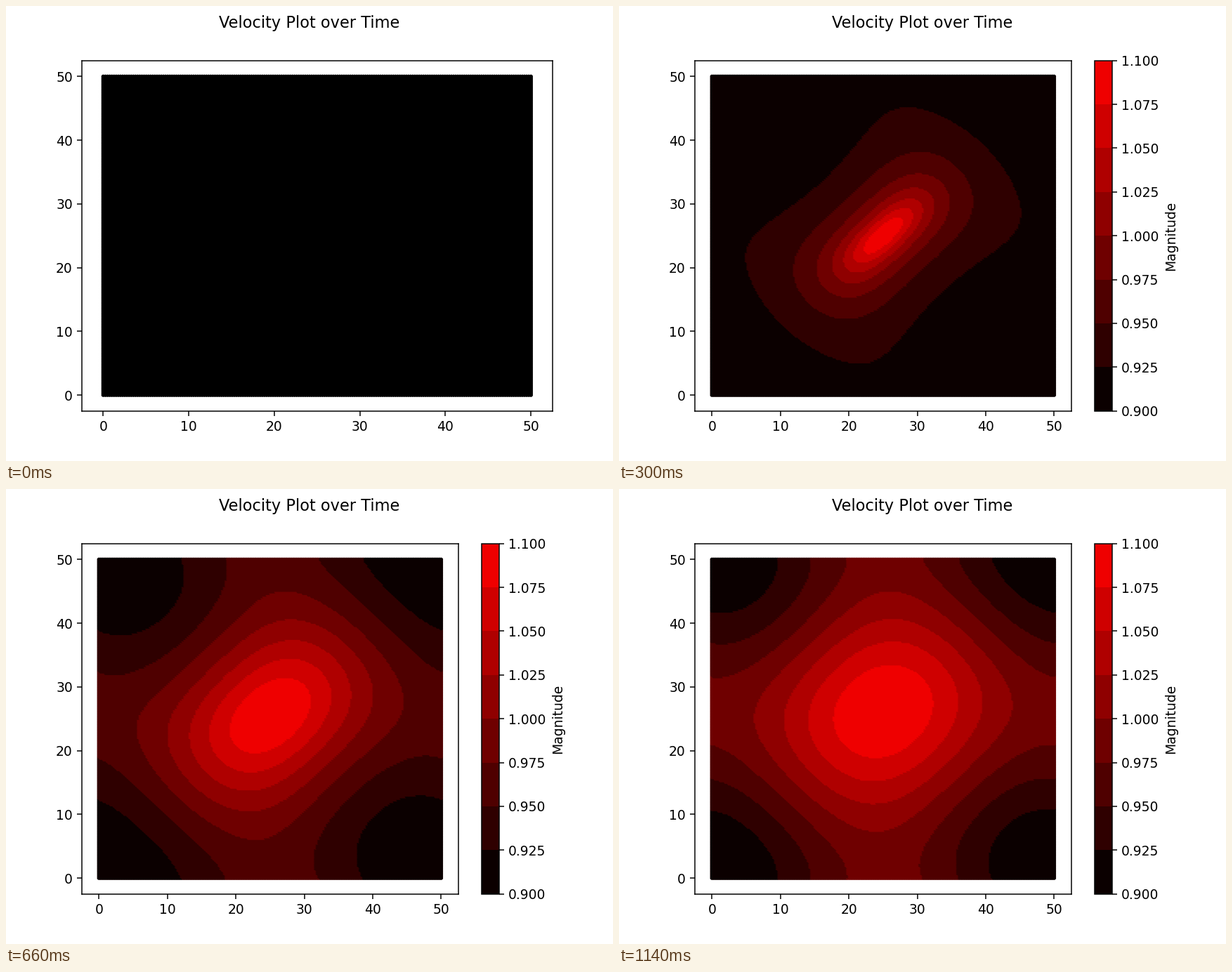
A matplotlib script for the animation above (1200 ms loop, 864x648 px).

```python
import numpy as np
import matplotlib.pyplot as plt
from matplotlib.animation import FuncAnimation
from matplotlib.colors import ListedColormap

FRAMES, INTERVAL = 20, 60
SIZE, POINTS = 50, 200
PERIOD = SIZE * POINTS / (POINTS - 1)
CENTRE = PERIOD / 2

axis = np.linspace(0, SIZE, POINTS)
gx, gy = (g.ravel() for g in np.meshgrid(axis, axis))


def blob(n):
    """Periodic tilted blob: 1 at its centre, 0 at the opposite corner."""
    age = max(n - 3, 0)
    sharpness = 96 / (age ** 2 + 0.1)
    tilt = min(0.8, 0.99 * np.exp(-age / 9.5))
    drift = 0.08 * max(n - 4, 0)
    x = 2 * np.pi * (gx - CENTRE) / PERIOD
    y = 2 * np.pi * (gy - CENTRE - drift) / PERIOD
    q = np.sin(x / 2) ** 2 + np.sin(y / 2) ** 2 - tilt / 2 * np.sin(x) * np.sin(y)
    return (1 - q / 2) / np.sqrt(1 + sharpness * q)


def field(n):
    if n < 2:
        return np.full_like(gx, 0.51 * n)
    return np.clip(blob(n), 0, 0.999)


def reds(levels):
    return ListedColormap([(v / 255, 0, 0) for v in levels])


shades = 15 + 32 * np.arange(8)
shades[0] = 11
BANDS = reds(shades)
shades[0], shades[3:5] = 0, 128
FLAT = reds(shades)

fig, ax = plt.subplots(figsize=(6.4, 4.8), dpi=135)
fig.suptitle("Velocity Plot over Time")
wide = ax.get_position()
dots = ax.scatter(gx, gy, c=field(0), s=9, linewidths=0,
                  cmap=FLAT, vmin=0.9, vmax=1.1)
bar = fig.colorbar(dots, ax=ax, label="Magnitude",
                   ticks=np.linspace(0.9, 1.1, 9), format="%.3f")
narrow = ax.get_position()


def draw(n):
    ax.set_position(wide if n == 0 else narrow)
    bar.ax.set_visible(n > 0)
    dots.set_cmap(FLAT if n < 2 else BANDS)
    dots.set_array(0.9 + 0.2 * field(n))
    return [dots]


anim = FuncAnimation(fig, draw, frames=FRAMES, interval=INTERVAL,
                     init_func=lambda: [dots], repeat=True, blit=False)
plt.show()
```
